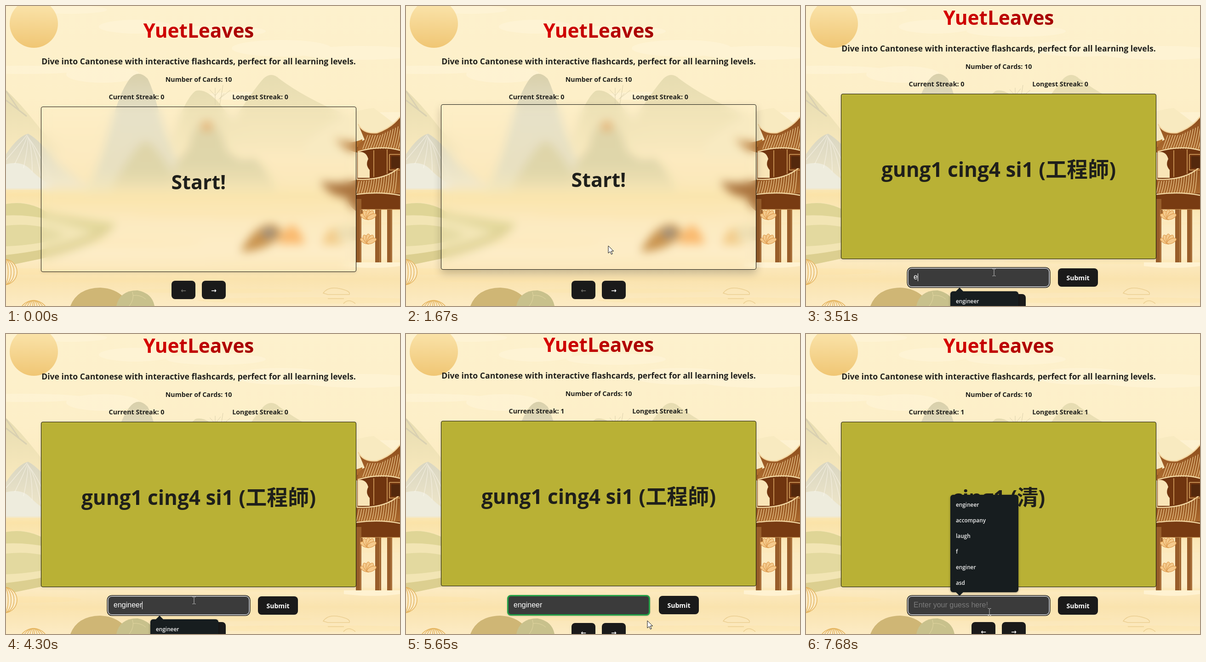
Recreate the animation shown at these times as an HTML page. Size 857 by 653 pixels, loop 8 s.

```html
<!DOCTYPE html>
<html lang="en">
<head>
<meta charset="utf-8">
<title>Flashcards</title>
<style>
html, body { margin: 0; width: 100%; height: 100%; overflow: hidden; }
body { position: relative; background: #fbe8b8; font-family: "Open Sans", "Noto Sans CJK TC", "Noto Sans CJK", sans-serif; font-weight: 700; color: #1f1f1b; }
body * { box-sizing: border-box; }
#scene { position: absolute; left: 0; top: 0; display: block; }
#page { position: absolute; left: 0; top: 0; width: 838px; }
#page > *, .abs { position: absolute; }
.label { transform: translate(-50%, -50%); white-space: nowrap; line-height: 1.3; }
.small { font-size: 14.25px; }
.mid { font-size: 17.65px; }
#title { left: 419px; top: 52px; font-size: 42.3px; color: transparent;
  background: linear-gradient(90deg, #d80000, #a30000); -webkit-background-clip: text; background-clip: text; }
#card { left: 76px; width: 686px; height: 360px; border: 1px solid #15150f; border-radius: 4px; }
#face { left: 342px; top: 163px; }
#face .han { font-size: 46px; }
#input { background: #3b3b3b; border-radius: 8px; }
#typed { left: 234px; white-space: pre; font: 16px/20px "Liberation Sans", Arial, sans-serif; }
#caret { width: 1px; height: 17px; background: #fff; }
.btn { background: #1a1a1a; border-radius: 8px; color: #fff; display: flex; align-items: center; justify-content: center; }
.arrow { width: 52px; height: 40px; padding-top: 2px; font: 700 14px "DejaVu Sans", sans-serif; }
#submit { width: 87px; height: 40px; font-size: 14.1px; }
#list { left: 314px; width: 148px; background: #171d1f; border-radius: 6px; padding-top: 4px; box-shadow: 0 1px 4px rgba(0,0,0,.4); font-size: 11.8px; font-weight: 600; color: #f1f1f1; }
#list div { height: 34px; line-height: 34px; padding-left: 12px; }
#list::after { content: ""; position: absolute; left: 12px; border: 8px solid transparent; }
#list.above::after { top: 100%; border-top-color: #171d1f; }
#list.below::after { bottom: 100%; border-bottom-color: #171d1f; }
</style>
</head>
<body>
<svg id="scene" width="857" height="653" viewBox="0 0 857 653">
  <defs>
    <linearGradient id="sky" x2="0" y2="1">
      <stop offset="0" stop-color="#fdf1cd"/><stop offset=".3" stop-color="#fdefc8"/>
      <stop offset=".5" stop-color="#fceabf"/><stop offset=".6" stop-color="#fbe8b8"/>
      <stop offset=".63" stop-color="#fae3a9"/><stop offset=".72" stop-color="#fceabf"/>
      <stop offset=".83" stop-color="#fdedc8"/><stop offset=".91" stop-color="#fae3ae"/><stop offset="1" stop-color="#fcebc4"/>
    </linearGradient>
    <linearGradient id="sun" x2="0" y2="1"><stop offset="0" stop-color="#fbe6af"/><stop offset="1" stop-color="#f0c674"/></linearGradient>
    <linearGradient id="peak" x2="0" y2="1"><stop offset="0" stop-color="#d9d0ab"/><stop offset=".35" stop-color="#e5e0c8"/><stop offset=".8" stop-color="#e6dfc0"/><stop offset="1" stop-color="#f3e6bb"/></linearGradient>
    <linearGradient id="front" x2="0" y2="1"><stop offset="0" stop-color="#dcd2a6"/><stop offset=".6" stop-color="#ddd4a8"/><stop offset="1" stop-color="#f5e4b2"/></linearGradient>
    <linearGradient id="hill" x2="0" y2="1"><stop offset="0" stop-color="#e6dcb1"/><stop offset="1" stop-color="#f9e9bd"/></linearGradient>
    <linearGradient id="snow" x2="0" y2="1"><stop offset="0" stop-color="#d9d6c2"/><stop offset="1" stop-color="#f3e9ca"/></linearGradient>
    <linearGradient id="roof" x2="0" y2="1"><stop offset="0" stop-color="#8d4d1c"/><stop offset="1" stop-color="#ad6c30"/></linearGradient>
  </defs>
  <rect width="857" height="653" fill="url(#sky)"/>
  <g id="clouds" fill="#fff6dc" opacity=".5"></g>
  <circle cx="60.5" cy="38.5" r="52.5" fill="url(#sun)"/>

  <path d="M-5 178Q35 215 75 268L130 320H-5Z" fill="url(#hill)"/>
  <path d="M0 185L28 226M0 205L45 240" stroke="#d9d0b1" stroke-width="3"/>
  <path d="M465 295Q535 185 560 158Q577 142 594 158Q650 200 735 235V320H465Z" fill="url(#hill)"/>
  <path d="M350 320Q385 205 412 185Q435 178 465 213L530 300Z" fill="url(#hill)"/>
  <path d="M650 300Q720 230 800 222L857 265V330H650Z" fill="#f8eac0"/>
  <path d="M455 215V178M465 215L472 172M443 182L455 195L467 180M475 190L463 203L488 183" stroke="#dcd1ac" fill="none"/>
  <path d="M170 405C220 335 228 215 268 160Q287 136 308 158C328 195 345 300 385 355L420 405Z" fill="url(#peak)"/>
  <path d="M225 405Q285 295 304 295T385 405Z" fill="url(#front)"/>
  <path d="M345 405Q375 325 398 310Q405 260 437 248Q467 260 480 315Q515 345 535 330Q565 345 590 405Z" fill="url(#front)"/>
  <circle cx="437" cy="262" r="11" fill="#e6ac6c"/>

  <path d="M-5 330Q25 283 48 278Q72 290 112 342L185 400H-5Z" fill="url(#snow)"/>
  <path d="M-5 346Q35 333 57 360Q76 378 108 397H-5Z" fill="#eeecdd"/>
  <g id="ridges" fill="none" stroke="#fffaf0" stroke-width="1.5" opacity=".5"></g>

  <g id="water" fill="#fbe1a3"></g>
  <!-- terraced fields -->
  <path d="M0 431Q48 420 95 452L238 475Q220 510 120 540L0 566Z" fill="#f2e5b4"/>
  <path d="M0 431Q50 422 95 452L238 473Q225 492 185 490Q80 452 0 456Z" fill="#dfd596"/>
  <path d="M238 476Q205 520 77 550L0 566V542Q135 527 200 488Z" fill="#dccf90"/>
  <path d="M0 478Q75 470 130 500Q80 520 0 523Z" fill="#e3d99f"/>

  <path d="M510 535Q540 478 575 475Q604 479 597 500Q570 533 510 535Z" fill="#c58c45"/>
  <ellipse cx="572" cy="494" rx="15" ry="10" fill="#8f8a84"/>
  <path d="M590 518Q609 475 625 477Q642 490 650 518Z" fill="#fab465"/>
  <path d="M687 519Q704 474 721 487L734 519Z" fill="#f2c57d"/>
  <path d="M720 480H762V510H715Z" fill="#ecddb0"/>

  <!-- pavilion -->
  <path d="M715 286Q741 305 775 290V320Q738 319 715 286Z" fill="#b2702e"/>
  <path d="M684 380Q720 393 776 374V455Q745 440 741 417Q701 414 684 380Z" fill="#a46a33"/>
  <path d="M764 307H857V382H764Z" fill="#70350f"/>
  <path d="M765 318Q783 315 788 333Q781 346 791 357V374H765Z" fill="#f9e5b7"/>
  <path d="M766 257Q777 279 807 276Q839 265 857 241V314Q813 304 765 317Q762 300 780 291Z" fill="url(#roof)"/>
  <path d="M762 378Q827 382 857 350V412H762Z" fill="url(#roof)"/>
  <path d="M762 408H857V443H762Z" fill="#783b12"/>
  <g id="tiles" fill="none" stroke="#e8c48a" stroke-width="1.4"></g>
  <path d="M766 257Q777 279 807 276Q839 265 857 241M765 317Q815 302 857 314M762 377Q823 381 857 350M762 410Q812 403 857 412" fill="none" stroke="#f3d6a0" stroke-width="2.5"/>
  <path d="M800 314V372M829 312V365M834 323H857M834 323V357H857M764 443H857" stroke="#dda966" stroke-width="1.5" fill="none"/>
  <path d="M838 327H857V353H838Z" fill="#54280c"/>
  <path d="M761 420H773V558H761ZM803 443H816V558H803ZM829 443H840V558H829Z" fill="#985d2a"/>
  <path d="M771 443V558M813 443V558M838 443V558" stroke="#cb985a"/>
  <g id="lotus"></g>
  <path d="M735 558H857V566Q800 574 735 566Z" fill="#fff2d1"/>

  <!-- foreground -->
  <path d="M140 653Q155 614 205 613Q250 615 270 653Z" fill="#cfb675"/>
  <path d="M240 653Q247 619 286 619Q318 625 323 653Z" fill="#c8c18c"/>
  <path d="M275 622Q280 638 268 653M276 630Q292 628 304 638" stroke="#e2d6a0" fill="none"/>
  <g id="gourds" fill="#fbebc7" stroke="#e5b45e" stroke-width="1.5"></g>
  <path d="M690 625Q700 610 725 615T747 628H700ZM734 648Q745 635 760 648M700 637H735" fill="none" stroke="#ebcf92" stroke-width="1.5"/>
</svg>

<div id="page">
  <div id="title" class="label">YuetLeaves</div>
  <div class="label mid" style="left:419px;top:120px">Dive into Cantonese with interactive flashcards, perfect for all learning levels.</div>
  <div class="label small" style="left:419px;top:160px">Number of Cards: 10</div>
  <div id="current" class="label small" style="left:284px;top:198px"></div>
  <div id="longest" class="label small" style="left:553px;top:198px"></div>
  <div id="card"><div id="face" class="abs label"></div></div>
  <div id="input"></div>
  <div id="submit" class="btn">Submit</div>
  <div id="prev" class="btn arrow" style="left:360px">←</div>
  <div id="next" class="btn arrow" style="left:426px">→</div>
</div>
<div id="typed" class="abs"></div>
<div id="caret" class="abs"></div>
<div id="list" class="abs"></div>
<svg id="pointer" class="abs" width="22" height="24" viewBox="-8 -10 22 24" style="overflow:visible">
  <path id="hand" d="M0 0V16L4 12.5L6.5 18.5L9 17.5L6.5 11.5H11.5Z" fill="#fff" stroke="#111"/>
  <path id="beam" d="M-3.5 -7.5H-1L0 -6.5L1 -7.5H3.5M0 -6.5V6.5M-3.5 7.5H-1L0 6.5L1 7.5H3.5" fill="none" stroke="#c9c9c9"/>
</svg>

<script>
const $ = id => document.getElementById(id);
const fill = (id, count, make) => { $(id).innerHTML = Array.from({ length: count }, (_, i) => make(i)).join(""); };
const clamp = v => Math.max(0, Math.min(1, v));

fill("clouds", 9, i => `<ellipse cx="${(i * 317 + 140) % 880}" cy="${(i * 47 + 8) % 245}" rx="${80 + i % 3 * 28}" ry="${9 + i % 4 * 3}"/>`);
fill("ridges", 6, i => `<path d="M${46 + i} ${280 + i * 2}Q${30 + i * 9} ${300 + i * 4} ${i * 19} ${335 + i * 9}"/>`);
fill("water", 12, i => `<ellipse cx="${(i * 211 + 60) % 857}" cy="${410 + i * 21}" rx="${130 + i % 4 * 40}" ry="${3 + i % 3 * 2}" opacity="${.15 + i % 3 * .1}"/>`);
fill("tiles", 16, i => {
  const x = 782 + i * 5.5;
  return `<path d="M${x + 5} ${281 - Math.max(0, i - 5) * 2.7}Q${x} 295 ${x - 6} 311M${x - 14} ${381 - i * i * .11}Q${x - 16} 395 ${x - 20} 407"/>`;
});
fill("lotus", 10, i => {
  const y = i < 5 ? 462 : 515, x = 788, a = (i % 5 - 2) * 32;
  return `<ellipse cx="${x}" cy="${y - 8}" rx="5" ry="11" fill="#f5ca8c" stroke="#d99345" transform="rotate(${a} ${x} ${y})"/>`;
});
fill("gourds", 10, i => {
  const [x, y, r] = i < 5 ? [-4, 579, 28] : [60, 673, 32];
  return `<ellipse cx="${x}" cy="${y}" rx="${r * (1 - i % 5 * .23)}" ry="${r}"/>`;
});

const LOOP = 8000;
const OPEN = 2020, FOCUS = 2970, TYPE = 3510, LAST = 4300, BLUR = 5050, RIGHT = 5180, SECOND = 6000, REFOCUS = 7150;
const words = ["engineer", "accompany", "laugh", "f", "enginer", "asd"];
const path = [
  [260, 446, 660], [520, 424, 520], [990, 421, 486], [1190, 421, 486], [1670, 440, 522], [1810, 448, 585],
  [1950, 455, 620], [2020, 457, 622], [2160, 470, 619], [2430, 409, 580], [4430, 409, 580], [4800, 560, 592],
  [5050, 600, 595], [5510, 600, 595], [5650, 525, 624], [5860, 465, 637], [6480, 465, 637], [6890, 399, 605]
];

function pointerAt(t) {
  const i = path.findIndex(p => p[0] > t);
  if (i === 0) return [-50, 700];
  if (i < 0) return path.at(-1).slice(1);
  const [t0, x0, y0] = path[i - 1], [t1, x1, y1] = path[i], k = (t - t0) / (t1 - t0);
  return [Math.round(x0 + (x1 - x0) * k), Math.round(y0 + (y1 - y0) * k)];
}

const place = (el, props) => { for (const k in props) el.style[k] = typeof props[k] === "number" ? props[k] + "px" : props[k]; };
const show = (el, on) => { el.style.visibility = on ? "visible" : "hidden"; };
const cache = new Map();
const html = (el, s) => { if (cache.get(el) !== s) { cache.set(el, s); el.innerHTML = s; } };

function typedAt(t) {
  if (t < TYPE || t >= SECOND) return "";
  return t >= LAST ? "engineer" : "engineer".slice(0, Math.min(7, 1 + Math.floor((t - TYPE) / 108)));
}

// Text and font size of the card
function faceAt(t) {
  if (t < OPEN) return t >= 850 && t < 1400 ? ["Press the next button!", 17.65] : ["Start!", 43];
  return [t < SECOND ? 'gung1 cing4 si1 (<span class="han">工程師</span>)' : 'cing1 (<span class="han">清</span>)', 44];
}

function render(t) {
  const open = t >= OPEN, right = t >= RIGHT && t < SECOND;
  const focus = (t >= FOCUS && t < BLUR) || t >= REFOCUS;
  const scroll = right ? 30 : open ? 28 : 0;
  const lift = clamp((t - 410) / 230) - clamp((t - 1790) / 160);
  const [x, y] = pointerAt(t);
  const over = (l, top, w, h) => x >= l && x < l + w && y >= top && y < top + h;

  $("page").style.top = -scroll + "px";
  html($("current"), "Current Streak: " + (t >= RIGHT ? 1 : 0));
  html($("longest"), "Longest Streak: " + (t >= RIGHT ? 1 : 0));
  const [face, size] = faceAt(t);
  html($("face"), face);
  place($("face"), { fontSize: size });
  place($("card"), {
    top: 219 - 5 * lift,
    background: open ? "#b9b135" : "rgba(255,240,200,.08)",
    backdropFilter: open ? "none" : "blur(10px)",
    boxShadow: `0 ${2 + 6 * lift}px ${6 + 12 * lift}px rgba(0,0,0,${.1 + .12 * lift})`
  });

  const [l, top, w, h] = right ? [220, 598, 311, 45] : [222, 598.5, 307, 40.5];
  place($("input"), {
    left: l, top, width: w, height: h,
    border: right ? "3px solid #23a047" : "1px solid rgba(190,195,205,.55)",
    boxShadow: focus ? "0 0 0 1px #fff, 0 0 0 2.5px #151515" : "0 1px 3px rgba(0,0,0,.2)"
  });
  const submitX = right ? 550 : 548, submitY = right ? 600 : 599;
  place($("submit"), { left: submitX, top: submitY - (open && over(submitX, submitY - scroll, 87, 40) ? 2 : 0) });
  const row = right ? 659 : open ? 655 : 598;
  $("prev").style.top = row + "px";
  $("prev").style.color = open ? "#fff" : "#6d6d68";
  $("next").style.top = row - (over(426, row - scroll - 8, 52, 48) ? 2 : 0) + "px";
  for (const id of ["input", "submit", "typed"]) show($(id), open);

  const text = typedAt(t);
  html($("typed"), text || "Enter your guess here!");
  place($("typed"), { top: 580, color: text ? "#fff" : "#7b7b7b" });
  const since = t >= REFOCUS ? t - REFOCUS : t >= LAST ? t - LAST : t >= TYPE ? Math.max(0, t - 4160) : t - FOCUS;
  place($("caret"), { left: text ? 234 + $("typed").offsetWidth : 234, top: 582 });
  show($("caret"), focus && since % 1060 < 530);

  const hits = words.filter(s => s.startsWith(text));
  const above = !text;
  html($("list"), hits.map(s => `<div>${s}</div>`).join(""));
  $("list").className = "abs " + (above ? "above" : "below");
  place($("list"), { top: above ? 350 : 621, height: hits.length * 34 + 8 });
  show($("list"), focus);

  const beam = open && over(223, 571, 306, 39);
  place($("pointer"), { left: x - 8, top: y - 10 });
  show($("hand"), !beam);
  show($("beam"), beam);
}

const start = performance.now();
function tick(now) {
  render(Math.max(0, now - start) % LOOP);
  requestAnimationFrame(tick);
}
render(0);
requestAnimationFrame(tick);
</script>
</body>
</html>
```
